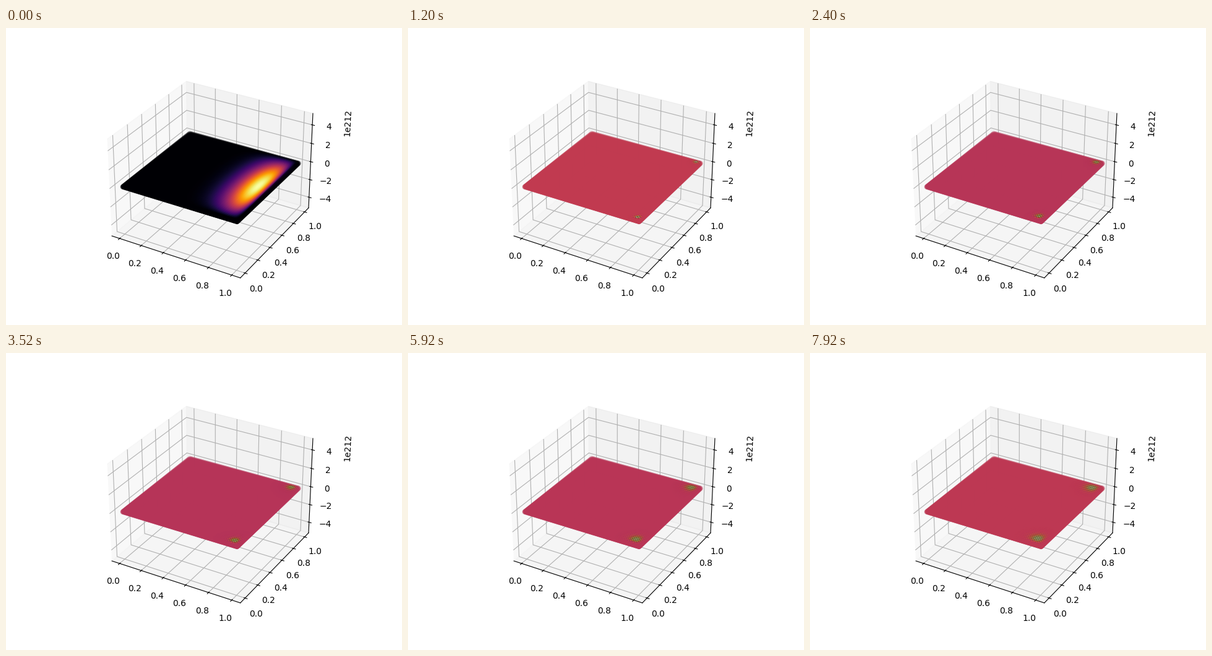
Write a matplotlib script that moves like this. It is 640x480 px and loops after 8000 ms.

```python
import numpy as np
import matplotlib.pyplot as plt
from matplotlib.animation import FuncAnimation

POINTS = 100
STEPS = 100
DT = 0.01
Z_LIMIT = 5.22e212

axis = np.linspace(0, 1, POINTS)
X, Y = np.meshgrid(axis, axis, indexing="ij")
COURANT2 = (DT / (axis[1] - axis[0])) ** 2


def laplacian(u):
    lap = np.zeros_like(u)
    lap[1:-1, 1:-1] = (u[2:, 1:-1] + u[:-2, 1:-1] + u[1:-1, 2:]
                       + u[1:-1, :-2] - 4 * u[1:-1, 1:-1])
    return lap


def solve_wave():
    """Explicit wave equation, fixed edges, released from rest.

    The step is too long to be stable, so a checkerboard grows in two corners.
    """
    start = X**10 * (1 - X) * Y * (1 - Y)
    history = [start, start + 0.5 * COURANT2 * laplacian(start)]
    while len(history) < STEPS:
        prev, now = history[-2:]
        history.append(2 * now - prev + COURANT2 * laplacian(now))
    return history


waves = solve_wave()
fig = plt.figure(figsize=(6.4, 4.8), dpi=100)
ax = fig.add_subplot(projection="3d")
ax.set_zlim(-Z_LIMIT, Z_LIMIT)
# One filled disc as wide as a default marker with its outline
MARKER_AREA = (np.sqrt(20) + 1.5) ** 2
cloud = None


def draw(step):
    global cloud
    if cloud is not None:
        cloud.remove()
    cloud = ax.scatter(X.ravel(), Y.ravel(), np.zeros(X.size),
                       c=waves[step].ravel(), cmap="inferno",
                       s=MARKER_AREA, edgecolors="none")
    return cloud,


anim = FuncAnimation(fig, draw, frames=STEPS, interval=80,
                     repeat=True, repeat_delay=0)
plt.show()
```
